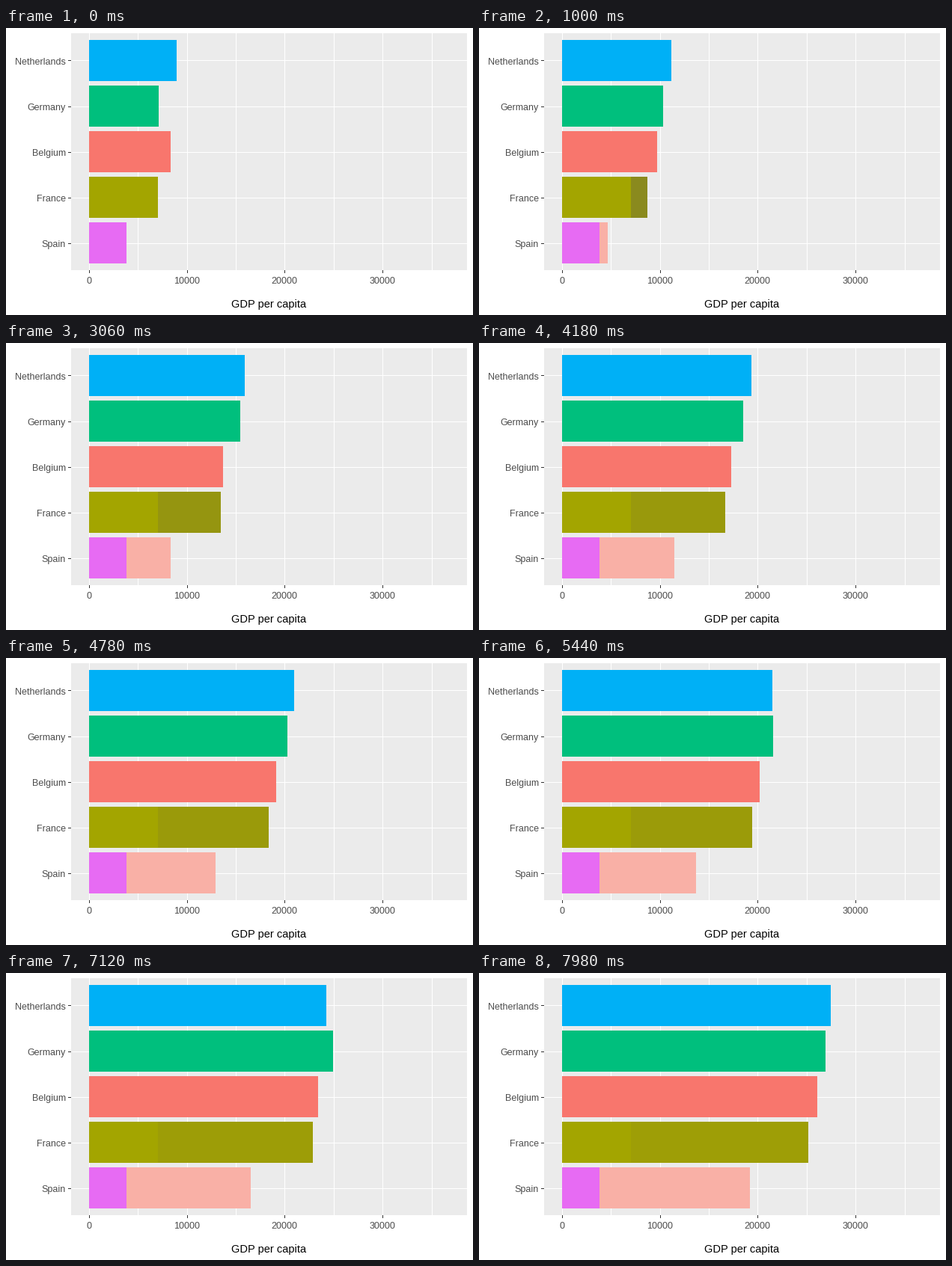
A matplotlib script for the animation above (8 s loop, 624 px wide and 384 px high).

```python
import numpy as np
import matplotlib
import matplotlib.pyplot as plt
from matplotlib.animation import FuncAnimation
from matplotlib.patches import Rectangle

matplotlib.rcParams["font.family"] = ["Liberation Sans"]
matplotlib.rcParams["toolbar"] = "None"

W, H, DPI = 624, 384, 100
FRAMES, INTERVAL = 400, 20

# name, color, first GDP and growth per period (thousands), sine wave strengths
COUNTRIES = [
    ("Netherlands", "#00b0f6", 8.94, 2.23, (0.08, 0.01, -0.77, 0.60)),
    ("Germany", "#00bf7d", 7.14, 2.42, (1.01, -0.01, 0.05, 0.25)),
    ("Belgium", "#f8766d", 8.34, 2.15, (-0.96, -0.62, -0.50, 0.44)),
    ("France", "#a3a500", 7.03, 2.21, (-0.29, -0.41, -0.41, 0.18)),
    ("Spain", "#e76bf3", 3.83, 1.85, (-1.12, -0.51, -0.72, 0.36)),
]
FRANCE, SPAIN = 3, 4
PERIODS = np.arange(10)
KNOTS = np.round(PERIODS * 250 / 12)  # steps at which a period begins

# Panel geometry in pixels
LEFT, TOP, RIGHT, BOTTOM = 87, 7, 616, 324
X0, SCALE = 111.12, 13.0685
BAR_LEFT, BAR_TOP, BAR_H, PITCH = 111, 16, 55, 61
TICK = 4


def to_px(thousands):
    return round(X0 + thousands * SCALE)


def gdp_curve(first, growth, waves):
    """Steady growth with slow booms and slumps, sampled once per period."""
    swing = sum(a * np.sin(k * np.pi * PERIODS / 8)
                for k, a in enumerate(waves, 1))
    return first + growth * PERIODS + swing


fig = plt.figure(figsize=(W / DPI, H / DPI), dpi=DPI, facecolor="white")
ax = fig.add_axes([0, 0, 1, 1])
ax.set_xlim(0, W)
ax.set_ylim(H, 0)
ax.axis("off")


def box(x, y, w, h, color, z=1):
    patch = Rectangle((x, y), w, h, facecolor=color, linewidth=0,
                      antialiased=False, zorder=z)
    return ax.add_patch(patch)


def label(x, y, text, px, color, ha):
    ax.text(x, y, text, fontsize=px * 72 / DPI, color=color,
            ha=ha, va="baseline")


box(LEFT, TOP, RIGHT - LEFT, BOTTOM - TOP, "#ebebeb", 0)
for value in range(0, 40, 5):
    x = to_px(value)
    box(x, TOP, 1, BOTTOM - TOP, "white")
    if value % 10 == 0:
        box(x, BOTTOM, 1, TICK, "#333333")
        label(x, 342, str(value * 1000), 12.5, "#4d4d4d", "center")

curves, tails = [], []
for i, (name, color, first, growth, waves) in enumerate(COUNTRIES):
    y = BAR_TOP + PITCH * i
    mid = round(43.45 + 61.1 * i)
    box(LEFT, mid, RIGHT - LEFT, 1, "white")
    box(LEFT - TICK, mid, TICK, 1, "#333333")
    label(80, y + 33, name, 12.5, "#4d4d4d", "right")
    # the first value stays in full color above the growing bar
    width = to_px(first) - BAR_LEFT
    box(BAR_LEFT, y, width, BAR_H, color, 3)
    tails.append(box(BAR_LEFT, y, width, BAR_H, color, 2))
    curves.append(gdp_curve(first, growth, waves))
label(351, 374, "GDP per capita", 14.67, "black", "center")
tails[SPAIN].set_facecolor("#f9b0a6")


def olive(step):
    """Dull at first, clearing as the bar grows."""
    dull = 1 / max(step, 35)
    tone = (163 - 880 * dull) / 255
    return tone, tone, 1050 * dull / 255


def step_at(frame):
    # bursts of three quick steps, then a 100 ms hold
    turn, pos = divmod(frame, 7)
    return 3 * turn + min(pos, 1) + pos // 6


def draw(frame):
    step = step_at(frame)
    for tail, curve in zip(tails, curves):
        tail.set_width(to_px(np.interp(step, KNOTS, curve)) - BAR_LEFT)
    tails[FRANCE].set_facecolor(olive(step))
    return tails


anim = FuncAnimation(fig, draw, frames=FRAMES, interval=INTERVAL,
                     init_func=lambda: draw(0), repeat=True,
                     repeat_delay=0, blit=False)
plt.show()
```
